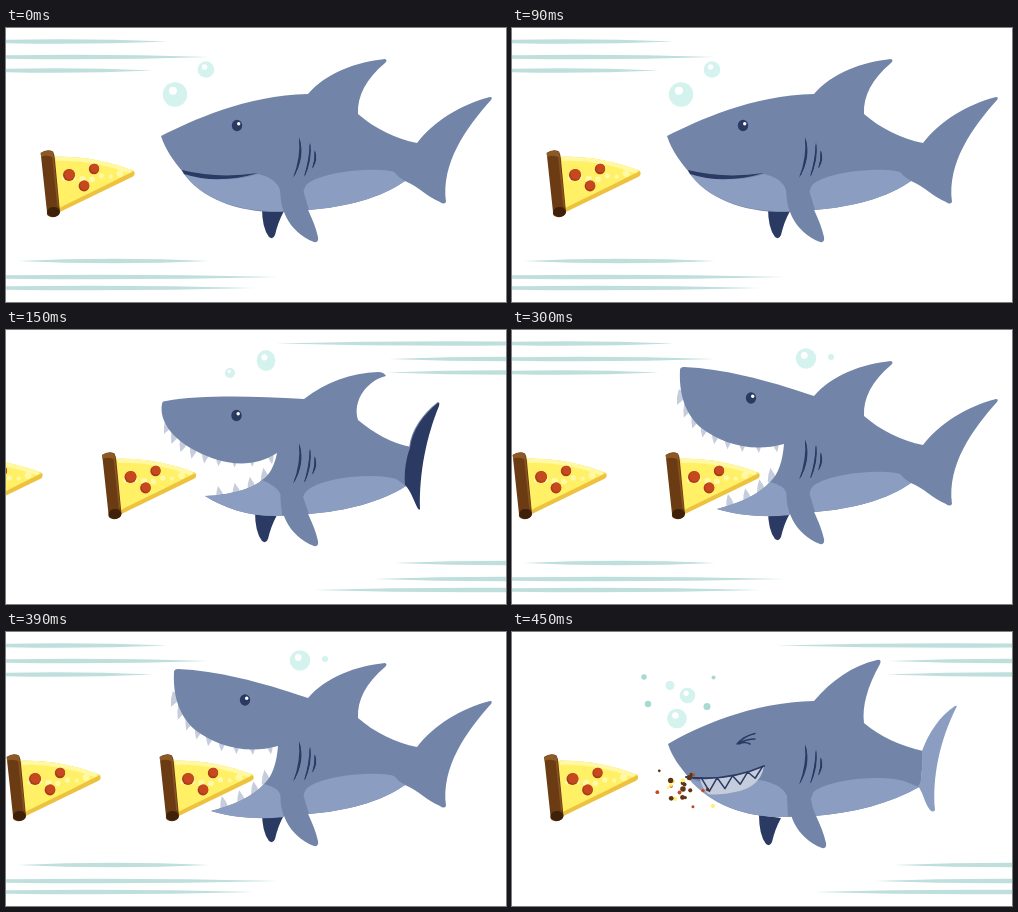
An HTML page that plays this animation: 500x274 px, repeating every 0.6 s.

```html
<!DOCTYPE html>
<html lang="en">
<head>
<meta charset="utf-8">
<title>Shark and pizza</title>
<style>
html, body { margin: 0; width: 100%; height: 100%; overflow: hidden; background: #fff; }
svg { display: block; width: 100%; height: 100%; }
</style>
</head>
<body>
<svg id="stage" viewBox="0 0 500 274"></svg>
<script>
const BODY = '#7285a9', BELLY = '#8b9dc0', DARK = '#2a3a62', TOOTH = '#c5ccdc';
const STREAK = '#bfdfdd', BUBBLE = '#d4f2ee', TEAL = '#a9d9d3';
const CRUST = '#6b3c14', RED = '#c5481f', YELLOW = '#fff066', CREAM = '#fff9a6';

const fill = (d, color) => `<path d="${d}" fill="${color}"/>`;
const line = (d, w, color = DARK) =>
  `<path d="${d}" fill="none" stroke="${color}" stroke-width="${w}" stroke-linecap="round" stroke-linejoin="round"/>`;
const dot = (x, y, r, color, ry = r) => `<ellipse cx="${x}" cy="${y}" rx="${r}" ry="${ry}" fill="${color}"/>`;
const move = (x, y, art) => `<g transform="translate(${x} ${y})">${art}</g>`;
const repeat = (n, draw) => Array.from({ length: n }, (_, i) => draw(i, i / (n - 1))).join('');
const mix = (a, b, t) => a + (b - a) * t;
const onCurve = ([a, b, c], t) => [0, 1].map(k => mix(mix(a[k], b[k], t), mix(b[k], c[k], t), t));

let seed = 7;
const random = () => (seed = seed * 16807 % 2147483647) / 2147483647;
const spread = (center, reach) => center + (random() + random() - 1) * reach;

const bubble = (x, y, r, ry = r) =>
  dot(x, y, r, BUBBLE, ry) + dot(x - r * .17, y - ry * .3, r * .33, '#fff');

// Speed lines: thin lenses; those that leave the stage are centred on its edge
const rows = [13.5, 29, 42.5, 233, 249, 260];
const streak = (x1, x2, y, h) => {
  const mid = (x1 + x2) / 2;
  return fill(`M${x1} ${y}Q${mid} ${y - h} ${x2} ${y}Q${mid} ${y + h} ${x1} ${y}Z`, STREAK);
};
const leftStreaks = [162, 203, 147, 203, 273, 249].map((end, i) =>
  streak(i === 3 ? 12 : -end / 3, end, rows[i], 4.4)).join('');
const rightStreaks = [270, 383, 380, 388, 368, 308].map((start, i) =>
  streak(start, 620, rows[i], 4.6)).join('');

const pepperoni = (x, y, r) => dot(x, y, r, '#a93a1c') + dot(x + .6, y - .8, r - .8, RED);
const slice =
  fill('M48 129C75 128 102 133 128 143Q130 147 126 149L58 182L52 185Z', '#ecc23e') +
  fill('M48 129C75 128 102 133 128 143L98 158L57 178L52 181Z', YELLOW) +
  line('M52 131C75 130 100 135 123 143', 4, CREAM) +
  repeat(7, (i, t) => dot(mix(58, 114, t), spread(mix(152, 145, t), mix(22, 3, t)), 2 + random() * 1.5, CREAM)) +
  pepperoni(63, 147, 6) + pepperoni(88, 141, 5.2) + pepperoni(78, 158, 5.4) +
  fill('M34.5 125Q41 120.5 47 123.5Q49 127 49 132L54 184Q52 190 45 189Q40 188 41 184L35 128Z', CRUST) +
  fill('M35 125Q41 121 47 124L48 130Q41 126 35 129Z', '#8d5a25') +
  line('M47 130L52 178', 1.6, '#8a5220') +
  dot(47.5, 184, 6.4, '#3f210a', 5);
const pizza = x => move(x, 0, slice);

const gills = fill('M293 109Q300 129 287 150Q295 129 293 109Z', DARK) +
  fill('M304 114Q307 133 298 149Q303 132 304 114ZM308.5 122Q313 132 306 141Q309 132 308.5 122Z', DARK) +
  line('M293.5 112Q297.5 129 288.5 147M304 117Q304.5 132 299 147M309 124Q310 132 307 139', 1);
const darkFin = fill('M256 180Q256 200 263 209Q267 212 269 207Q272 194 278 183Z', DARK);
const sideFin = fill('M275 158C272 178 282 204 308 214Q313 215 312 209C308 190 298 178 297 165Q299 157 304 151Z', BODY);
const eye = (x, y) => dot(x, y, 5.2, DARK, 5.7) + dot(x + 1.7, y - 1.8, 1.7, '#fff');

const teeth = (n, curve, turns, sizes) => repeat(n, (i, t) =>
  `<path d="M-5-3Q-4 5 0 12Q4 5 5-3Z" fill="${TOOTH}" transform="translate(${onCurve(curve, t)}) ` +
  `rotate(${mix(...turns, t)}) scale(${mix(...sizes, t)})"/>`);
const upperTeeth = (...curve) => teeth(9, curve, [25, -8], [1, .6]);
const lowerTeeth = (...curve) => teeth(4, curve, [168, 172], [.85, .95]);

// Interlocked teeth hang as a zigzag below the smile
const smile = [[174, 145], [215, 150], [252, 134]];
const zigzag = 'M' + repeat(9, (i, t) => {
  const [x, y] = onCurve(smile, mix(.19, .98, t));
  return `${x} ${y + i % 2 * mix(14, 8, t)} `;
});

function shark({ back, head, belly, jaw, face, behind = '', gill = 0, fin = [0, 0], side = [0, 0] }) {
  return move(...fin, darkFin) + behind + fill(back + head, BODY) + fill(belly, BELLY) +
    fill(jaw, BELLY) + move(...side, sideFin) + move(0, gill, gills) + face;
}

const swimBack = 'M302 66C320 45 350 34 379 31Q382 32 379 35C360 51 351 68 352 86C368 100 390 111 411 115' +
  'C428 93 454 77 484 69Q487 69 485 72C460 100 435 135 440 174Q438 177 434 174C421 169 412 158 399 153' +
  'C375 170 340 179 303 182L275 184';
const swimBelly = 'M297 162C300 152 320 146 345 143Q375 140 388 144Q392 149 399 153C375 170 340 179 303 182Z';

const closed = shark({
  back: swimBack,
  head: 'C235 185 195 172 176 143C168 133 160 123 155 108C185 93 240 67 302 66Z',
  belly: swimBelly,
  jaw: 'M176 143Q215 158 252 146Q270 150 274 162L278 183C235 185 195 172 176 143Z',
  face: fill('M176 142Q212 151 252 145Q212 157 178 146Z', DARK) + eye(231, 97.5)
});

const tailEdge = 'M404 118C406 100 418 84 432 73';
const opening = shark({
  back: 'M298 69C320 52 345 43 372 42Q378 42 380 46C362 50 346 70 352 90C368 103 385 113 405 117' +
    'L400 156C375 172 340 181 303 184L275 186',
  head: 'C245 187 220 179 199 166C224 165 246 159 256 150Q267 143 271 123C245 140 215 134 190 121' +
    'C165 108 153 90 156 74Q156 71 160 71C195 65 245 66 298 69Z',
  belly: 'M297 167C300 156 320 150 345 147Q375 144 390 149L400 156C375 172 340 181 303 184Z',
  jaw: 'M199 166C224 165 246 159 256 150Q271 156 275 165L276 186C245 187 220 179 199 166Z',
  behind: upperTeeth([163, 93], [185, 138], [265, 127]) + lowerTeeth([214, 166], [240, 164], [259, 149]),
  face: eye(230.5, 85.5) + line(tailEdge, 2, BODY) +
    fill(tailEdge + 'Q434 72 433 76C421 105 413 142 414 179Q413 181 411 177' +
      'C407 168 404 160 399 155C398 142 400 128 404 118Z', DARK),
  gill: 4, fin: [-7, 2], side: [0, 2]
});

const wide = shark({
  back: swimBack,
  head: 'C250 188 225 185 205 179C228 173 248 164 259 151Q270 140 272 114C240 123 210 114 188 97' +
    'C171 81 167 60 168 40Q168 37 172 37C212 39 252 49 302 66Z',
  belly: swimBelly,
  jaw: 'M205 179C228 173 246 165 258 152Q272 155 275 164L278 185C250 188 225 185 205 179Z',
  behind: upperTeeth([170, 64], [190, 120], [264, 115]) + lowerTeeth([218, 174], [246, 168], [260, 149]),
  face: eye(239, 68)
});

const chewing = shark({
  back: 'M302 69C320 48 340 34 365 28Q370 27 368 32C355 55 350 75 352 91C368 105 390 114 411 119' +
    'L409 154C378 172 340 181 303 184L275 185',
  head: 'C235 186 200 174 178 147C168 135 160 125 156 112C185 95 240 70 302 69Z',
  belly: 'M297 166C300 156 320 150 345 147Q375 144 392 149L407 155C378 172 340 181 303 184Z',
  jaw: 'M176 146Q215 160 248 148Q270 152 275 164L276 185C235 186 200 174 176 146Z',
  face: fill('M188 147Q222 148 252 134Q249 153 228 159Q206 164 196 162Q190 156 188 147Z', TOOTH) +
    line(zigzag, 1.5) + line(`M${smile[0]}Q${smile[1]} ${smile[2]}`, 1.9) +
    line('M225 112Q232 104 243 101.5M227 111Q235 107 243 107M227 112Q233 109 238 112', 1.5) +
    fill('M410 119C417 100 428 84 443 74Q446 73 444 76C428 108 420 145 423 178Q421 181 418 178' +
      'C412 170 411 160 406 154Q411 150 410 119Z', BELLY),
  gill: 3, fin: [-9, 3], side: [2, 2]
});

const crumbColors = ['#5f3314', RED, '#5f3314', YELLOW];
const crumbs = repeat(24, i =>
  dot(spread(173, 36), spread(155, 24), (i % 2 ? 1 : 1.4) + random() * 1.4, crumbColors[i % 4]));

const poses = [
  leftStreaks + bubble(169, 66.5, 12.2) + bubble(200, 41.5, 8.3) + pizza(0) + closed,
  rightStreaks + bubble(260, 30.5, 9.3, 10.5) + bubble(224, 43, 5) + pizza(-92) + pizza(61.5) + opening,
  leftStreaks + bubble(294, 28.5, 10.2) + dot(319, 27, 3, BUBBLE) + pizza(-34) + pizza(119) + wide,
  move(-6, 0, rightStreaks) + bubble(165, 86.5, 9.8) + bubble(175.5, 63.5, 7.8) + dot(158, 53.5, 4.5, BUBBLE) +
    dot(132, 45, 2.7, TEAL) + dot(201.5, 45.5, 2, TEAL) + dot(136, 72, 3.2, TEAL) + dot(195, 74.5, 3.5, TEAL) +
    pizza(-2.5) + chewing + crumbs
];

const stage = document.getElementById('stage');
stage.innerHTML = poses.map(art => `<g>${art}</g>`).join('');
const groups = [...stage.children];

function show() {
  const step = Math.floor(performance.now() % 600 / 150);
  groups.forEach((g, i) => g.style.display = i === step ? '' : 'none');
  requestAnimationFrame(show);
}
show();
</script>
</body>
</html>
```
